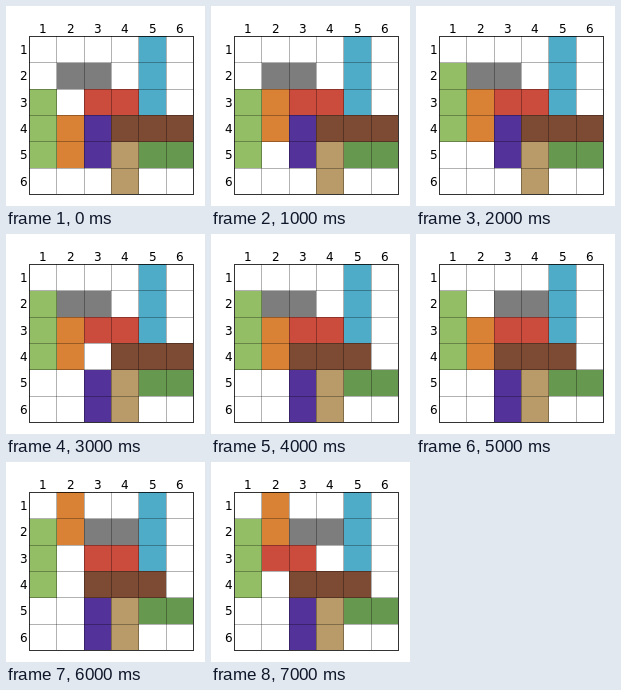
Write an HTML page with a canvas that moves like this. It is 199 px wide and 200 px high and loops after 8000 ms.

```html
<!DOCTYPE html>
<html lang="en">
<head>
<meta charset="utf-8">
<title>Sliding blocks</title>
<style>
  html, body { margin: 0; width: 100%; height: 100%; overflow: hidden; background: #fff; }
  canvas { display: block; }
</style>
</head>
<body>
<canvas id="board" width="199" height="200"></canvas>
<script>
const ctx = document.getElementById('board').getContext('2d');
const SIZE = 6;
const STEP_MS = 1000;
const CELL_W = 27.3;
const CELL_H = 26.35;
const gridX = i => 23.5 + CELL_W * i;
const gridY = i => 30.35 + CELL_H * i;

// Each block covers w by h cells, starting at a zero-based column and row.
const blocks = {
  green:  { col: 0, row: 2, w: 1, h: 3, color: '#93be66' },
  gray:   { col: 1, row: 1, w: 2, h: 1, color: '#7d7d7d' },
  red:    { col: 2, row: 2, w: 2, h: 1, color: '#cb4b3d' },
  cyan:   { col: 4, row: 0, w: 1, h: 3, color: '#4facc9' },
  orange: { col: 1, row: 3, w: 1, h: 2, color: '#d98236' },
  purple: { col: 2, row: 3, w: 1, h: 2, color: '#533299' },
  brown:  { col: 3, row: 3, w: 3, h: 1, color: '#7d4a33' },
  tan:    { col: 3, row: 4, w: 1, h: 2, color: '#b99b69' },
  forest: { col: 4, row: 4, w: 2, h: 1, color: '#66994f' }
};

// One move per step: block, column shift, row shift.
const moves = [
  ['orange', 0, -1],
  ['green', 0, -1],
  ['purple', 0, 1],
  ['brown', -1, 0],
  ['gray', 1, 0],
  ['orange', 0, -2],
  ['red', -1, 0]
];
const LOOP_MS = (moves.length + 1) * STEP_MS;

function drawBlock(name, step) {
  let { col, row, w, h, color } = blocks[name];
  for (const [mover, dx, dy] of moves.slice(0, step)) {
    if (mover === name) {
      col += dx;
      row += dy;
    }
  }
  const x = Math.round(gridX(col)), y = Math.round(gridY(row));
  ctx.fillStyle = color;
  ctx.fillRect(x, y, Math.round(gridX(col + w)) - x, Math.round(gridY(row + h)) - y);
}

// Cells round to the nearest pixel, lines fall on the pixel that holds them.
function drawGrid() {
  const left = Math.floor(gridX(0)), top = Math.floor(gridY(0));
  const width = Math.floor(gridX(SIZE)) - left, height = Math.floor(gridY(SIZE)) - top;
  ctx.fillStyle = 'rgba(0, 0, 0, 0.3)';
  for (let i = 1; i < SIZE; i++) {
    ctx.fillRect(Math.floor(gridX(i)), top, 1, height);
    ctx.fillRect(left, Math.floor(gridY(i)), width, 1);
  }
  ctx.strokeStyle = 'rgba(0, 0, 0, 0.8)';
  ctx.lineWidth = 1;
  ctx.strokeRect(left + 0.5, top + 0.5, width, height);
}

function drawLabels() {
  ctx.fillStyle = '#000';
  ctx.font = '12px "DejaVu Sans", sans-serif';
  for (let i = 0; i < SIZE; i++) {
    ctx.fillText(i + 1, Math.round(33.3 + CELL_W * i), 27);
    ctx.fillText(i + 1, 14, Math.round(48 + CELL_H * i));
  }
}

function render(now) {
  const step = Math.floor((now % LOOP_MS) / STEP_MS);
  ctx.fillStyle = '#fff';
  ctx.fillRect(0, 0, 199, 200);
  for (const name in blocks) drawBlock(name, step);
  drawGrid();
  drawLabels();
}

let start;
function tick(now) {
  start ??= now;
  render(now - start);
  requestAnimationFrame(tick);
}
render(0);
requestAnimationFrame(tick);
</script>
</body>
</html>
```
